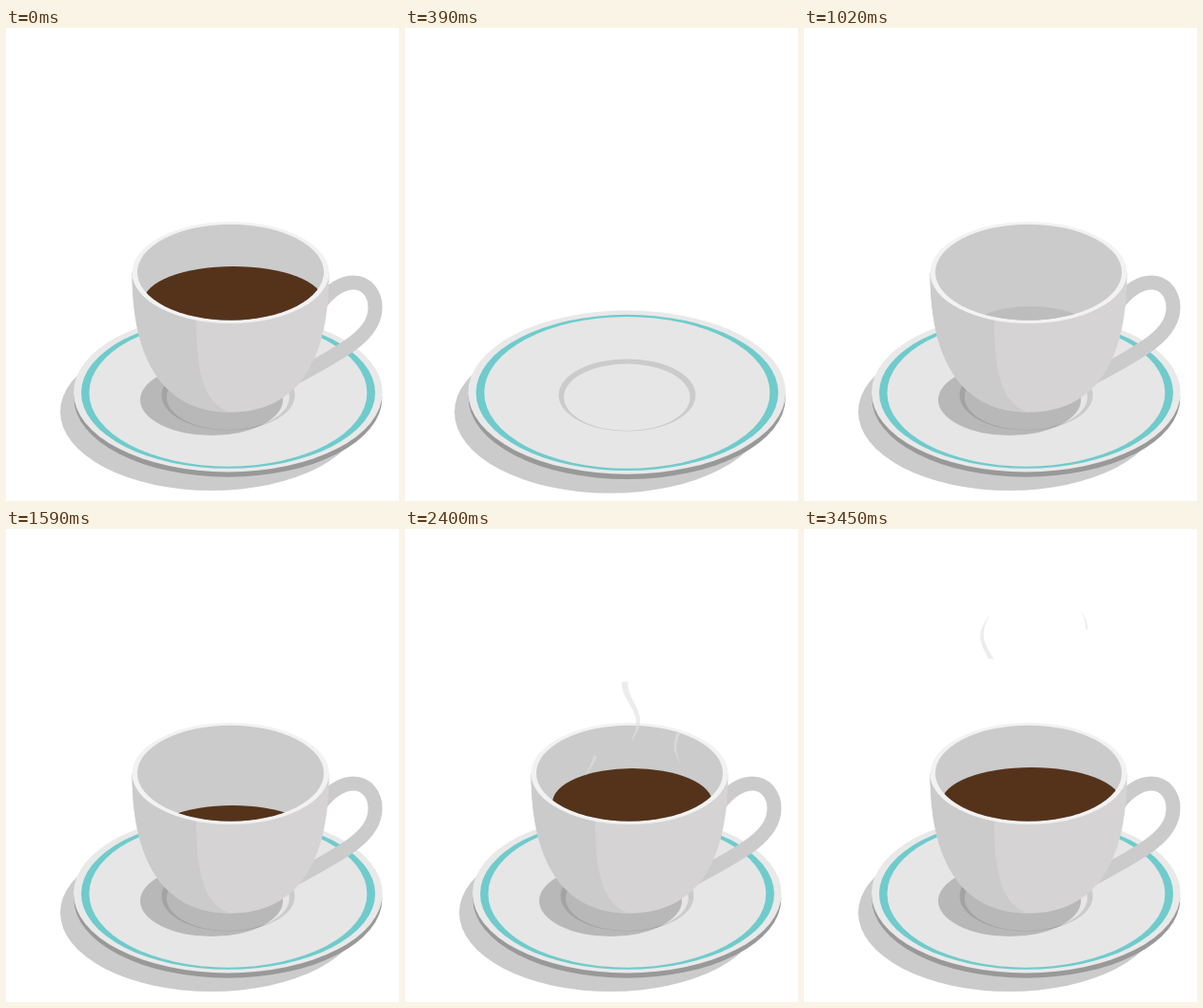
Animation of 413x498 px, one loop 4280 ms. Source, as an HTML page with a canvas:

```html
<!DOCTYPE html>
<html lang="en">
<head>
<meta charset="utf-8">
<title>Coffee cup</title>
<style>
html, body { margin: 0; height: 100%; overflow: hidden; background: #fff; }
canvas { display: block; }
</style>
</head>
<body>
<canvas width="413" height="498"></canvas>
<script>
const LOOP = 4280, STEP = 30, GREY = '#cbcbcb', LIGHT = '#d6d3d4';
const ctx = document.querySelector('canvas').getContext('2d');
const handle = new Path2D('M330 290C346 270 358 268 365 268C380 268 388 281 388 294C388 322 360 338 296 372');
const HANDLE_LENGTH = 215;

// Eased value from a flat list: time, value, time, value, ...
function track(t, ...keys) {
  if (t <= keys[0]) return keys[1];
  for (let i = 2; i < keys.length; i += 2) {
    if (t < keys[i]) {
      const p = (t - keys[i - 2]) / (keys[i] - keys[i - 2]);
      return keys[i - 1] + (keys[i + 1] - keys[i - 1]) * (1 - Math.cos(Math.PI * p)) / 2;
    }
  }
  return keys[keys.length - 1];
}

function oval(x, y, rx, ry, color) {
  ctx.beginPath();
  ctx.ellipse(x, y, rx, ry, 0, 0, 7);
  ctx.fillStyle = color;
  ctx.fill();
}

function zoom(x, y, s) {
  ctx.translate(x, y);
  ctx.scale(s, s);
  ctx.translate(-x, -y);
}

function layer(draw) {
  ctx.save();
  draw();
  ctx.restore();
}

function saucer(t) {
  zoom(235, 387, track(t, 60, 0, 455, 1.1, 640, 1));
  oval(216, 404, 159, 83, GREY);
  oval(233.3, 389.5, 162, 83.2, '#999');
  oval(233.3, 383.6, 162.3, 83.8, '#e9e9e9');
  oval(233.5, 384, 154.5, 79.8, '#6fcbcc');
  oval(233.4, 384, 146, 77.7, '#e6e6e6');
  oval(233.5, 386.5, 70, 37, GREY);
  oval(233.3, 388.7, 64.5, 34.3, '#e6e6e6');
}

function coffee(t) {
  if (t < 1290) return;
  const top = Math.max(252, 307 - (t - 1290) * 0.0534) - track(t, 2400, 0, 2700, 1);
  const x = track(t, 1800, 238, 2040, 233, 2400, 239);
  const rx = track(t, 1800, 90, 2040, 80, 2400, 84, 2700, 94);
  oval(x, top + 36, rx, 36, '#55331b');
}

function cup(t) {
  const size = track(t, 390, 0, 560, 1);
  if (!size) return;
  const drop = track(t, 390, 48, 675, -9.5, 960, 0);
  const rim = 257.5 + drop;

  layer(() => {
    zoom(216, 390, size * (1 - drop * 0.008));
    oval(216, 391.5, 75, 37.5, 'rgba(0,0,0,.2)');
  });

  const grown = track(t, 600, 0, 990, HANDLE_LENGTH);
  if (grown) layer(() => {
    ctx.setLineDash([grown, 999]);
    ctx.lineWidth = 15;
    ctx.strokeStyle = GREY;
    ctx.stroke(handle);
  });

  zoom(236, 404, size);
  layer(() => {
    const side = 366 + drop / 2;
    ctx.beginPath();
    ctx.moveTo(132.5, rim);
    ctx.bezierCurveTo(132.5, side, 177, 404.5, 236, 404.5);
    ctx.bezierCurveTo(295, 404.5, 339.5, side, 339.5, rim);
    ctx.fillStyle = LIGHT;
    ctx.fill();
    ctx.clip();
    ctx.fillStyle = GREY;
    ctx.fill(new Path2D('M200 200V309C200 365 209 398 238 405H120V200Z'));
    if (drop > 0) oval(236, rim + drop / 2, 103.5, 53.5, LIGHT);
  });
  oval(236, rim, 103.5, 53.5, '#f2f2f2');
  layer(() => {
    oval(236, rim - 0.3, 98, 50.5, GREY);
    ctx.clip();
    oval(238, 323, 68, 30, '#bdbdbd');
    coffee(t);
  });
}

// A wavy tapered strand, visible only between its tail and its head.
function wisp(t, w) {
  const head = track(t, w.rise, w.bottom, w.rise + 618, w.top);
  const tail = track(t, w.fade, w.bottom, w.fade + w.last, w.top);
  if (tail - head < 0.2) return;
  const left = [], right = [];
  for (let y = head; ; y = Math.min(y + 2, tail)) {
    const x = w.x + w.swing * Math.cos((y - w.crest) / w.wave * 2 * Math.PI);
    const u = (y - w.top) / (w.bottom - w.top);
    const half = w.width / 2 * Math.sin(Math.PI * u) ** 0.7;
    left.push([x - half, y]);
    right.unshift([x + half, y]);
    if (y >= tail) break;
  }
  ctx.beginPath();
  for (const [x, y] of left.concat(right)) ctx.lineTo(x, y);
  ctx.fillStyle = 'rgba(224,224,224,.62)';
  ctx.fill();
}

const wisps = [
  { x: 238, swing: 7, crest: 203, wave: 80, top: 98, bottom: 224, width: 6.5, rise: 2090, fade: 2450, last: 900 },
  { x: 194, swing: 7, crest: 152, wave: 80, top: 90, bottom: 260, width: 6.5, rise: 2258, fade: 2700, last: 1126 },
  { x: 290.5, swing: 6.5, crest: 105, wave: 82.7, top: 87, bottom: 248, width: 5, rise: 2215, fade: 2600, last: 1064 }
];

function frame(now) {
  const clock = Math.floor(now % LOOP / STEP) * STEP;
  const t = clock < 60 ? 9000 : clock; // the loop opens on the finished cup
  const steam = clock < 60 ? t : Math.min(t, 3430);
  ctx.clearRect(0, 0, 413, 498);
  layer(() => saucer(t));
  layer(() => cup(t));
  for (const w of wisps) wisp(steam, w);
  requestAnimationFrame(frame);
}
requestAnimationFrame(frame);
</script>
</body>
</html>
```
